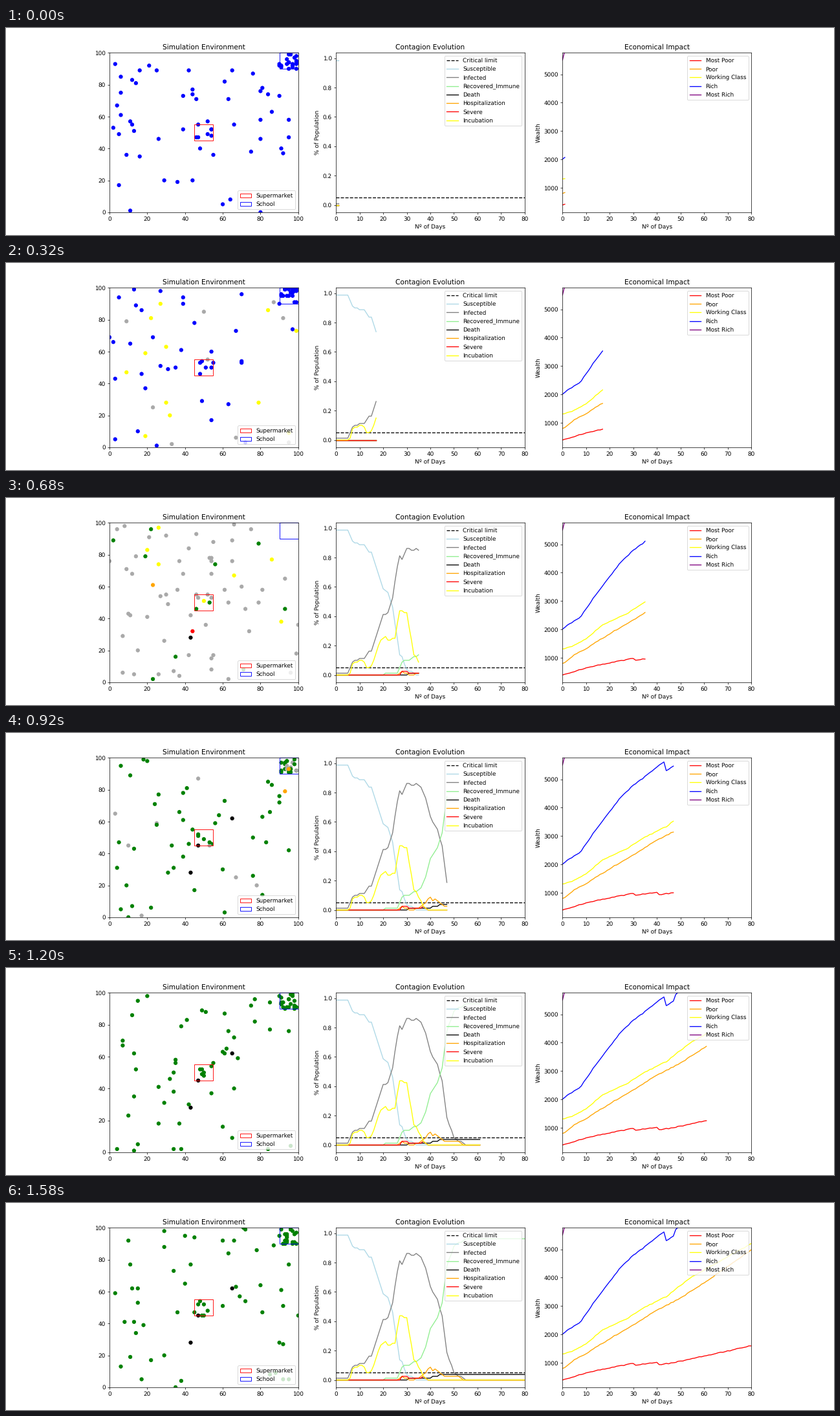
Write a matplotlib script that moves like this. It is 1280 by 320 pixels and loops after 1600 ms.

```python
import numpy as np
import matplotlib.pyplot as plt
from matplotlib.animation import FuncAnimation
from matplotlib.patches import Rectangle

plt.rcParams["text.hinting"] = "none"

DAYS = 80
N = 80
PUPILS = 21
WALKERS = N - PUPILS
STRIDE = 6
MARKET, SCHOOL, BLOCK = 45, 90, 10
GRAVES = {31: (43, 28), 41: (47, 45), 44: (65, 62)}

days = np.arange(DAYS + 1)
rng = np.random.default_rng(7)


def curve(*points):
    """Daily values interpolated between (day, value) key points."""
    return np.interp(days, *zip(*points))


def heads(*points):
    return np.rint(curve(*points)).astype(int)


def money(*points):
    """Wealth curve with a slight daily wobble after the first day."""
    wobble = rng.normal(0, 9, DAYS + 1)
    wobble[0] = 0
    return curve(*points) + wobble


# Epidemic, in number of people
susceptible = heads((5, 79), (7, 73), (10, 71), (12, 71), (14, 67), (15, 67),
                    (17, 59), (20, 47), (22, 45), (24, 37), (27, 11), (28, 10),
                    (30, 3), (34, 0))
recovered = heads((20, 0), (21, 1), (26, 1), (28, 7), (34, 10), (36, 12),
                  (38, 18), (40, 28), (43, 34), (45, 42), (47, 62), (50, 73),
                  (55, 77))
dead = sum((days >= d).astype(int) for d in GRAVES)
infected = N - susceptible - recovered - dead
hospital = heads((26, 0), (28, 2), (31, 0), (33, 0), (36, 2), (40, 7), (41, 5),
                 (42, 6), (46, 2), (52, 2), (54, 0))
severe = heads((27, 0), (28, 2), (30, 2), (31, 1), (36, 1), (37, 2), (38, 1),
               (40, 0))
incubating = heads((5, 0), (6, 1), (7, 6), (10, 8), (12, 7), (13, 4), (15, 5),
                   (17, 12), (19, 19), (21, 21), (22, 19), (25, 20), (27, 35),
                   (30, 34), (33, 11), (34, 10), (37, 2), (39, 0))

health = [
    ("Susceptible", "lightblue", susceptible),
    ("Infected", "gray", infected),
    ("Recovered_Immune", "lightgreen", recovered),
    ("Death", "black", dead),
    ("Hospitalization", "orange", hospital),
    ("Severe", "red", severe),
    ("Incubation", "yellow", incubating),
]

wealth = [
    ("Most Poor", "red", money(
        (0, 394), (10, 640), (17, 780), (30, 990), (31, 920), (40, 1015),
        (41, 935), (47, 1000), (80, 1600))),
    ("Poor", "orange", money(
        (0, 800), (1, 830), (5, 1110), (10, 1310), (15, 1600), (30, 2330),
        (40, 2860), (50, 3280), (61, 3870), (80, 4980))),
    ("Working Class", "yellow", money(
        (0, 1310), (5, 1440), (10, 1670), (17, 2160), (27, 2540), (35, 2960),
        (44, 3330), (50, 3735), (55, 4040), (80, 5200))),
    ("Rich", "blue", money(
        (0, 2010), (3, 2200), (8, 2480), (13, 3090), (20, 3860), (25, 4400),
        (30, 4780), (40, 5430), (43, 5610), (44, 5290), (47, 5480), (48, 5680),
        (80, 8600))),
    ("Most Rich", "purple", 5500 + 330 * days),
]

# Order of infection; pupils, listed last, catch it later
key = rng.random(N)
key[WALKERS:] = 0.4 + 0.6 * key[WALKERS:]
rank = key.argsort().argsort()
removed = recovered + dead
dead_ranks = {removed[d] - 1: d for d in GRAVES}


def build_tracks():
    """Random walks, with pupils in school on weekdays and daily shoppers."""
    home = rng.integers(0, 101, (N, 2))
    steps = np.rint(rng.normal(0, STRIDE, (DAYS, N, 2)))
    path = 100 - abs(100 - (home + steps.cumsum(axis=0)) % 200)
    for t in range(DAYS):
        if t % 7 < 5:
            path[t, WALKERS:] = SCHOOL + rng.integers(0, BLOCK, (PUPILS, 2))
        shoppers = rng.choice(WALKERS, 6, replace=False)
        path[t, shoppers] = MARKET + rng.integers(0, BLOCK + 1, (6, 2))
    for r, day in dead_ranks.items():
        path[day - 1:, rank == r] = GRAVES[day]
    return path


def person_color(r, day):
    ill = N - susceptible[day] if day > 1 else 0
    if r < removed[day]:
        return "black" if r in dead_ranks else "green"
    if r >= ill:
        return "blue"
    if r < removed[day] + severe[day]:
        return "red"
    if r < removed[day] + severe[day] + hospital[day]:
        return "orange"
    return "yellow" if r >= ill - incubating[day] else "darkgray"


tracks = build_tracks()
fig, (env, health_ax, money_ax) = plt.subplots(1, 3, figsize=(20, 5), dpi=64)

env.set(title="Simulation Environment", xlim=(0, 100), ylim=(0, 100))
dots = env.scatter(*tracks[0].T, c="blue")
for corner, color, label in ((MARKET, "red", "Supermarket"),
                             (SCHOOL, "blue", "School")):
    env.add_patch(Rectangle((corner, corner), BLOCK, BLOCK, fill=False,
                            edgecolor=color, label=label))
env.legend(loc="lower right")

health_ax.set(title="Contagion Evolution", xlabel="Nº of Days",
              ylabel="% of Population", xlim=(0, DAYS),
              ylim=(-0.049375, 1.036875))
health_ax.axhline(0.05, color="black", ls="--", label="Critical limit")
money_ax.set(title="Economical Impact", xlabel="Nº of Days", ylabel="Wealth",
             xlim=(0, DAYS), ylim=(139, 5755))

lines = []
for ax, series, scale in ((health_ax, health, N), (money_ax, wealth, 1)):
    for label, color, values in series:
        line, = ax.plot([], [], color=color, label=label)
        lines.append((line, values / scale))
    ax.legend(loc="upper right")


def update(i):
    day = i + 1
    dots.set_offsets(tracks[i])
    dots.set_color([person_color(r, day) for r in rank])
    for line, values in lines:
        line.set_data(days[:day + 1], values[:day + 1])
    return [dots] + [line for line, _ in lines]


anim = FuncAnimation(fig, update, frames=DAYS, interval=20, repeat=True,
                     repeat_delay=0, blit=False)
plt.show()
```
